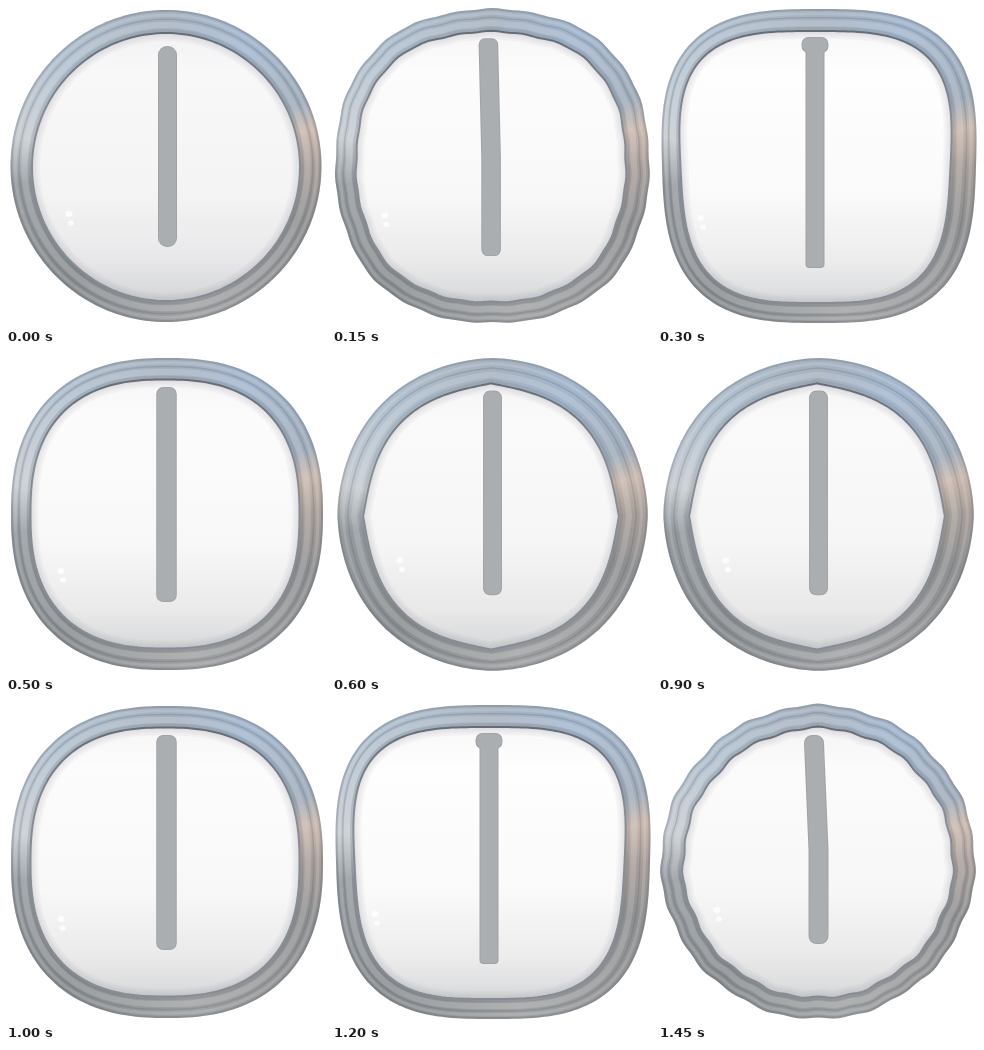
Animation of 320 by 320 pixels, one loop 1.5 s. Source, as an HTML page with a canvas:

```html
<!DOCTYPE html>
<html lang="en">
<head>
<meta charset="utf-8">
<title>Morphing badge</title>
<style>
html, body { margin: 0; width: 100%; height: 100%; overflow: hidden; background: #fff; }
canvas { display: block; width: 320px; height: 320px; }
</style>
</head>
<body>
<canvas id="stage" width="320" height="320"></canvas>
<script>
const ctx = document.getElementById('stage').getContext('2d');
const LOOP = 1500, STEP = 50, N = 192, TAU = Math.PI * 2;
const angles = Array.from({ length: N }, (_, i) => i / N * TAU);
const { sin, cos, abs } = Math;
const mix = (a, b, k) => a + (b - a) * k;

// Superellipse: n sets the squareness, taper widens the top, ripple shakes the edge.
function oval({ cx = 160, cy = 160, rx, ry = rx, n = 2, taper = 0, ripple = 0 }) {
  return angles.map(a => {
    const r = (abs(cos(a)) ** n + abs(sin(a)) ** n) ** (-1 / n);
    const shake = ripple * (sin(11 * a) + sin(27 * a)) / 2;
    return [cx + cos(a) * (r * rx * (1 - taper * sin(a)) + shake), cy + sin(a) * (r * ry + shake)];
  });
}
// Diamond with curved sides and sharp tips.
function diamond({ cx, cy, rx, ry, bulge }) {
  return angles.map(a => {
    const r = (1 + bulge * abs(sin(2 * a))) / (abs(cos(a)) + abs(sin(a)));
    return [cx + cos(a) * r * rx, cy + sin(a) * r * ry];
  });
}

const poses = [
  { at: 0,
    outer: oval({ rx: 155.5, ry: 156 }),
    inner: oval({ cy: 161, rx: 134 }),
    bar: { x: 161.5, top: 40, bottom: 241, width: 19, lean: 0, round: 9, bulb: 10 },
    gray: .04, spot: [63, 212] },
  { at: 50,
    outer: oval({ rx: 157, ripple: 1.5 }),
    inner: oval({ cy: 161, rx: 135, ripple: 1.5 }),
    bar: { x: 160.5, top: 33, bottom: 242, width: 20, lean: -4.5, round: 8, bulb: 10 },
    gray: .02, spot: [59, 212] },
  { at: 300,
    outer: oval({ cx: 161, rx: 157, n: 2.95, taper: .03 }),
    inner: oval({ cx: 157.5, cy: 161, rx: 135, ry: 136, n: 3.2, taper: .05 }),
    bar: { x: 157, top: 31, bottom: 262, width: 19, lean: 0, round: 4, bulb: 27 },
    gray: 0, spot: [43, 216] },
  { at: 500,
    outer: oval({ cx: 161, rx: 156, n: 2.4 }),
    inner: oval({ cx: 159, rx: 134.5, n: 2.5 }),
    bar: { x: 160.5, top: 33, bottom: 248, width: 20.5, lean: 0, round: 7, bulb: 10 },
    gray: .01, spot: [55, 221] },
  { at: 750,
    outer: oval({ cy: 161, rx: 154, ry: 157, n: 1.63 }),
    inner: diamond({ cx: 159, cy: 166, rx: 118, ry: 131, bulge: .24 }),
    bar: { x: 160.5, top: 42, bottom: 231, width: 16.5, lean: 0, round: 7, bulb: 8 },
    gray: .05, spot: [87, 195] }
];

function blend(a, b, k) {
  if (typeof a === 'number') return mix(a, b, k);
  if (Array.isArray(a)) return a.map((v, i) => blend(v, b[i], k));
  return Object.fromEntries(Object.keys(a).map(key => [key, blend(a[key], b[key], k)]));
}
// The second half of the loop runs the first half backwards.
function poseAt(time) {
  const t = Math.min(time, LOOP - time);
  const i = Math.max(1, poses.findIndex(p => p.at >= t));
  const a = poses[i - 1], b = poses[i];
  return blend(a, b, (t - a.at) / (b.at - a.at));
}

function trace(points) {
  const path = new Path2D();
  points.forEach(([x, y]) => path.lineTo(x, y));
  path.closePath();
  return path;
}
function stops(gradient, list) {
  list.forEach(([at, color]) => gradient.addColorStop(at, color));
  return gradient;
}
function line(path, color, width) {
  ctx.strokeStyle = color;
  ctx.lineWidth = width;
  ctx.stroke(path);
}
const vertical = list => stops(ctx.createLinearGradient(0, 26, 0, 296), list);

// Light from above: blue sky on the upper half, grey ground below, a warm gleam at right.
const metal = stops(ctx.createConicGradient(0, 160, 160), [
  [0, '#a79e99'], [.06, '#8e8f91'], [.22, '#a0a2a4'], [.36, '#888c8f'], [.48, '#93999e'],
  [.53, '#c6cbd0'], [.63, '#b0bfce'], [.75, '#a6b1be'], [.84, '#a3b6cd'], [.93, '#9fabb9'],
  [.96, '#c9b8ae'], [1, '#a79e99']
]);
const enamel = vertical([[0, '#f8f8f9'], [.15, '#fefefe'], [.6, '#fafafa'], [.85, '#ececed'], [1, '#d8d9da']]);
const lip = vertical([[0, '#666c73'], [.3, '#858c94'], [1, '#868c94']]);

function drawRing(p) {
  const ring = u => trace(blend(p.outer, p.inner, u));
  const rim = ring(0);
  ctx.fillStyle = metal;
  ctx.fill(rim);
  ctx.save();
  ctx.clip(rim);
  line(rim, 'rgba(75,84,94,.22)', 4);
  line(ring(.22), 'rgba(255,255,255,.14)', 3);
  line(ring(.4), 'rgba(70,80,90,.2)', 1.5);
  line(ring(.65), 'rgba(255,255,255,.16)', 6);
  line(ring(.9), 'rgba(70,78,86,.12)', 3);
  ctx.restore();
}

function drawFace(p) {
  const face = trace(p.inner);
  ctx.fillStyle = enamel;
  ctx.fill(face);
  ctx.fillStyle = `rgba(110,114,120,${p.gray})`;
  ctx.fill(face);
  ctx.save();
  ctx.clip(face);
  for (let w = 4; w <= 16; w += 4) line(face, 'rgba(120,125,130,.05)', w);
  const [x, y] = p.spot;
  ctx.fillStyle = 'rgba(255,255,255,.8)';
  ctx.beginPath();
  ctx.ellipse(x, y - 4, 3.5, 3, 0, 0, TAU);
  ctx.ellipse(x + 2, y + 5, 3, 2.5, 0, 0, TAU);
  ctx.fill();
  ctx.restore();
  line(face, lip, 2);
}

function drawBar({ x, top, bottom, width, lean, round, bulb }) {
  const half = width / 2 - round, mid = mix(top, bottom, .55);
  const body = trace([
    [x + lean - half, top + round], [x + lean + half, top + round],
    [x + half, mid], [x + half, bottom - round],
    [x - half, bottom - round], [x - half, mid]
  ]);
  const knob = new Path2D();
  if (bulb > width) knob.roundRect(x + lean - bulb / 2 + 2, top + 2, bulb - 4, 12, 5);
  ctx.lineJoin = 'round';
  // Darker edge first, then the lighter core inside it.
  [['#9fa3a6', 0], ['#abaeb0', 2]].forEach(([color, inset]) => {
    line(body, color, round * 2 - inset);
    line(knob, color, 4 - inset);
    ctx.fillStyle = color;
    ctx.fill(body);
    ctx.fill(knob);
  });
}

function render(time) {
  const p = poseAt(Math.floor(time / STEP) * STEP);
  ctx.fillStyle = '#fff';
  ctx.fillRect(0, 0, 320, 320);
  drawRing(p);
  drawFace(p);
  drawBar(p.bar);
}

const start = performance.now();
function tick() {
  render((performance.now() - start) % LOOP);
  requestAnimationFrame(tick);
}
tick();
</script>
</body>
</html>
```
